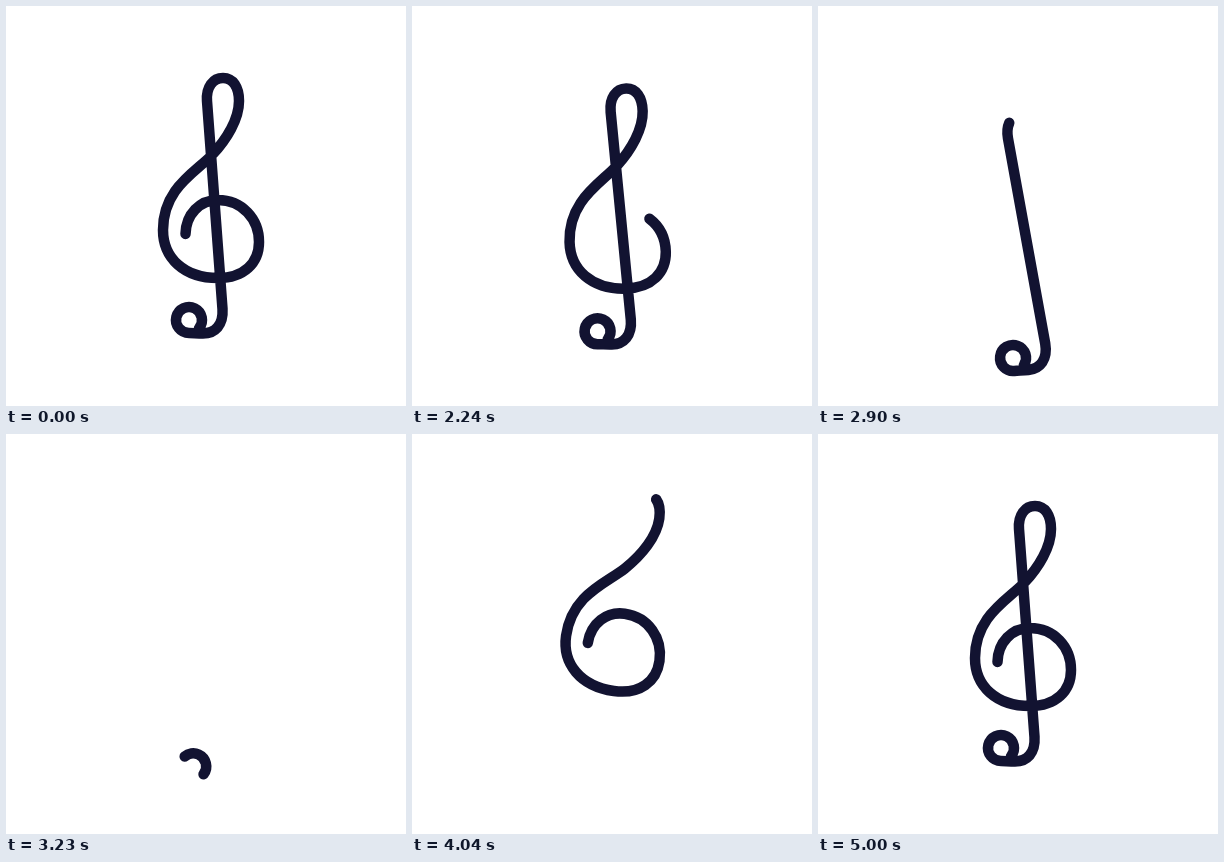
Write an HTML page that moves like this. It is 400 px wide and 400 px high and loops after 5060 ms.

```html
<!DOCTYPE html>
<html lang="en">
<head>
<meta charset="utf-8">
<title>Treble clef</title>
<style>
  html, body { margin: 0; width: 100%; height: 100%; overflow: hidden; background: #fff; }
  svg { display: block; width: 100%; height: 100%; }
  path { fill: none; stroke: #121331; stroke-width: 10.5; stroke-linecap: round; stroke-linejoin: round; }
</style>
</head>
<body>
<svg viewBox="0 0 400 400">
  <path id="clef" pathLength="1" d="M179.5 228
    C180 208 194 194 212 194 C236 194 253 213 253 236
    C253 257 238 272 212 272 C178 272 157 252 157 224
    C157 182 190 166 206 149 C221 133 233 113 233 95
    C233 81 227 72 217 72 C207 72 200 81 201 95
    L216.5 303 C217.5 319 209 327.5 197 327.5
    C191 327.5 187 327 183 327 A13 13 0 1 1 193 322.3"/>
</svg>
<script>
const LOOP = 5060;
const clef = document.getElementById('clef');

// Keyframes as [time in ms, value], eased in and out between neighbours.
const lift = [[2030, 0], [2650, 42], [3950, -16], [4040, -16], [4800, 0]];
const turn = [[2030, 0], [2750, -6.5], [4050, 8], [4800, 0]];
const erase = [[2030, 0], [2750, 0.5], [3350, 1]];
const draw = [[3350, 0], [4040, 0.54], [4800, 1]];

function valueAt(keys, t) {
  const next = keys.findIndex(([time]) => time > t);
  if (next === 0) return keys[0][1];
  if (next < 0) return keys[keys.length - 1][1];
  const [t0, v0] = keys[next - 1];
  const [t1, v1] = keys[next];
  const eased = (1 - Math.cos(Math.PI * (t - t0) / (t1 - t0))) / 2;
  return v0 + (v1 - v0) * eased;
}

function render(t) {
  const drawing = t >= 3350;
  const from = drawing ? 0 : valueAt(erase, t);
  const to = drawing ? valueAt(draw, t) : 1;
  const whole = from === 0 && to === 1;
  clef.style.visibility = to - from > 0.001 ? 'visible' : 'hidden';
  clef.setAttribute('stroke-dasharray', whole ? 'none' : `${to - from} 2`);
  clef.setAttribute('stroke-dashoffset', -from);
  clef.setAttribute('transform',
    `translate(0 ${valueAt(lift, t)}) rotate(${valueAt(turn, t)} 200 200)`);
}

const start = performance.now();
function tick() {
  render((performance.now() - start) % LOOP);
  requestAnimationFrame(tick);
}
tick();
</script>
</body>
</html>
```
